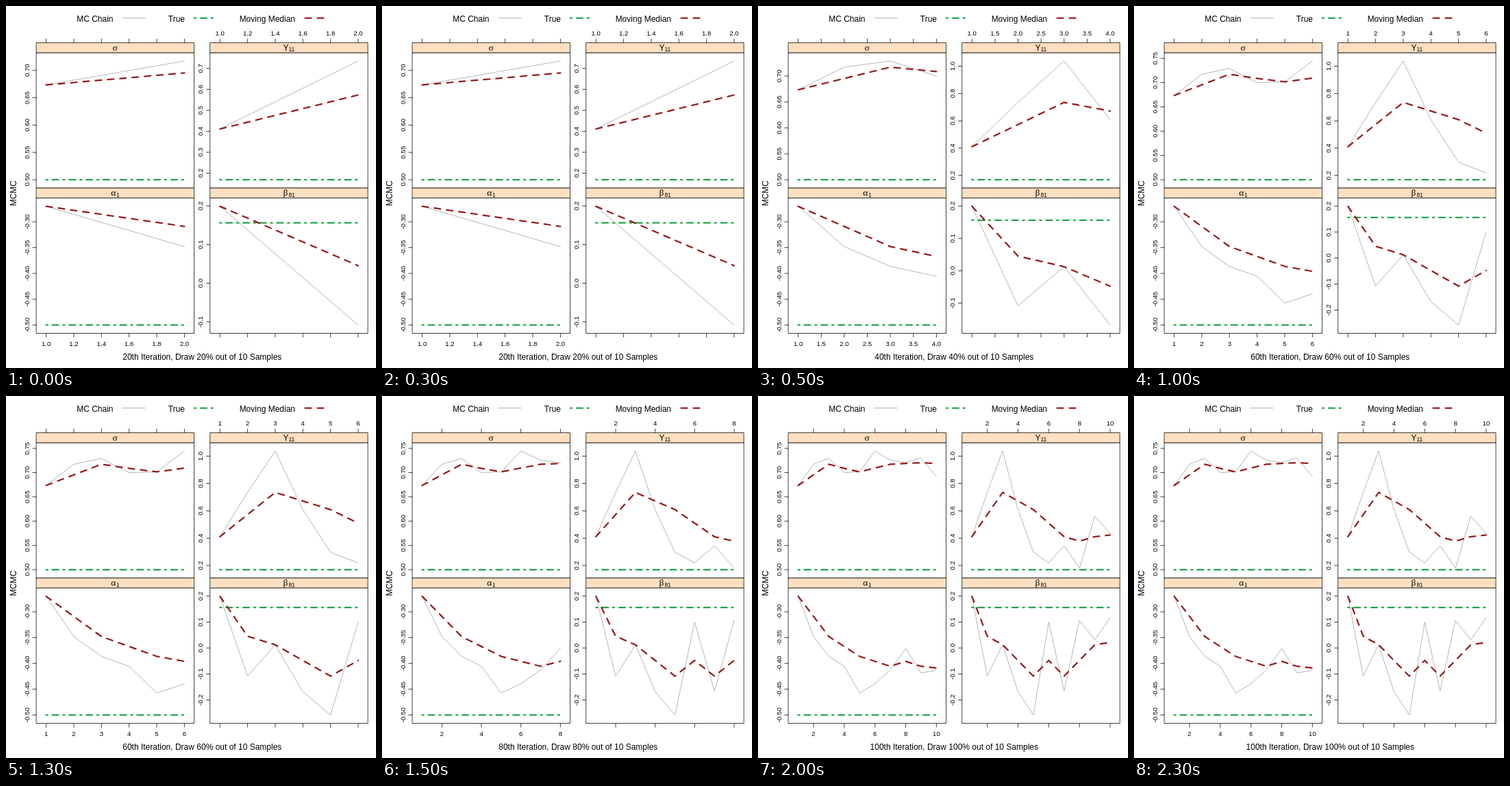
An HTML page with a canvas that plays this animation: 540x527 px, repeating every 2500 ms.

```html
<!DOCTYPE html>
<html lang="en">
<head>
<meta charset="utf-8">
<style>
  html, body { margin: 0; width: 100%; height: 100%; overflow: hidden; background: #fff; }
  canvas { display: block; }
</style>
</head>
<body>
<canvas id="stage" width="540" height="527"></canvas>
<script>
const ctx = document.getElementById('stage').getContext('2d');
const SANS = '"Liberation Sans", Arial, sans-serif';
const SERIF = '"Liberation Serif", "Times New Roman", serif';
const W = 230, H = 197, STRIP = 14.5, PAD = 0.07 / 1.14;
const X_STEPS = [0.2, 0.5, 1, 2, 2];

const CHAIN = { color: '#acacac', width: 0.9, dash: [] };
const TRUE = { color: '#1fa64a', width: 2.25, dash: [1, 3, 4, 3] };
const MEDIAN = { color: '#981b1b', width: 2.25, dash: [4, 4] };

const panels = [
  { x: 44.5, y: 68, symbol: 'σ', sub: '', truth: 0.5, digits: 2, step: () => 0.05,
    chain: [.6735, .7172, .729, .7, .7015, .7444, .7255, .7203, .7302, .691] },
  { x: 298.1, y: 68, symbol: 'Υ', sub: '11', truth: 0.169, digits: 1, step: n => n < 3 ? 0.1 : 0.2,
    chain: [.411, .735, 1.038, .609, .297, .219, .345, .1815, .561, .435] },
  { x: 44.5, y: 279.5, symbol: 'α', sub: '1', truth: -0.5, digits: 2, step: () => 0.05,
    chain: [-.27, -.348, -.3864, -.4056, -.4575, -.4395, -.4125, -.3711, -.4183, -.4135] },
  { x: 298.1, y: 279.5, symbol: 'β', sub: '81', truth: 0.1562, digits: 1, step: () => 0.1,
    chain: [.199, -.108, .0125, -.1675, -.2575, .1, -.1655, .1065, .031, .117] }
];

function median(values) {
  const s = [...values].sort((a, b) => a - b), m = s.length >> 1;
  return s.length % 2 ? s[m] : (s[m - 1] + s[m]) / 2;
}

function line(points, { color, width, dash }) {
  ctx.strokeStyle = color;
  ctx.lineWidth = width;
  ctx.lineCap = ctx.lineJoin = 'round';
  ctx.setLineDash(dash.map(d => d * width));
  ctx.beginPath();
  points.forEach(([x, y]) => ctx.lineTo(x, y));
  ctx.stroke();
  ctx.setLineDash([]);
}

function text(str, x, y, { size = 12, align = 'center', font = SANS, turn = 0 } = {}) {
  ctx.save();
  ctx.translate(x, y);
  ctx.rotate(turn);
  ctx.font = `${size}px ${font}`;
  ctx.textAlign = align;
  ctx.fillStyle = '#000';
  ctx.fillText(str, 0, 0);
  ctx.restore();
}

function tick(x, y, dx, dy) {
  ctx.strokeStyle = '#000';
  ctx.lineWidth = 0.75;
  ctx.lineCap = 'butt';
  ctx.beginPath();
  ctx.moveTo(x, y);
  ctx.lineTo(x + dx, y + dy);
  ctx.stroke();
}

// Multiples of step inside the padded range
function ticks(lo, hi, step) {
  const pad = 0.07 * (hi - lo), list = [];
  for (let k = Math.ceil((lo - pad) / step); k * step <= hi + pad; k++) list.push(k * step);
  return list;
}

const scale = (lo, hi, from, to) => v => from + (v - lo) / (hi - lo) * (to - from);

function frameBox(x, y, h, fill) {
  ctx.fillStyle = fill;
  ctx.fillRect(x, y, W, h);
  ctx.strokeStyle = '#000';
  ctx.lineWidth = 0.75;
  ctx.strokeRect(x, y, W, h);
}

function drawPanel(p, index, stage) {
  const n = 2 * (stage + 1), data = p.chain.slice(0, n);
  const lo = Math.min(p.truth, ...data), hi = Math.max(p.truth, ...data);
  const px = scale(1, n, p.x + W * PAD, p.x + W * (1 - PAD));
  const py = scale(lo, hi, p.y + H * (1 - PAD), p.y + H * PAD);
  const plot = values => values.map((v, i) => [px(i + 1), py(v)]);

  frameBox(p.x, p.y, H, '#fff');
  frameBox(p.x, p.y - STRIP, STRIP, '#ffdfbf');

  const mid = p.x + W / 2, base = p.y - 3.2;
  const left = mid - 3.9 - p.sub.length * 2.3;
  text(p.symbol, left, base, { size: p.symbol === 'Υ' ? 12 : 13.5, align: 'left', font: p.symbol === 'Υ' ? SANS : SERIF });
  text(p.sub, left + 7.8, base + 1.6, { size: 8.4, align: 'left' });

  for (const v of ticks(lo, hi, p.step(n))) {
    tick(p.x, py(v), -6, 0);
    text(v.toFixed(p.digits), p.x - 11, py(v), { size: 9.6, turn: -Math.PI / 2 });
  }
  const top = index < 2;
  for (const v of ticks(1, n, X_STEPS[stage])) {
    tick(px(v), top ? p.y - STRIP : p.y + H, 0, top ? -6 : 6);
    if (index === 1 || index === 2)
      text(v.toFixed(n < 5 ? 1 : 0), px(v), top ? 43 : 495, { size: 9.6 });
  }

  line(plot(data), CHAIN);
  line([[px(1), py(p.truth)], [px(n), py(p.truth)]], TRUE);
  line(plot(data.map((_, i) => median(data.slice(0, i + 1)))), MEDIAN);
}

function draw(stage) {
  ctx.fillStyle = '#fff';
  ctx.fillRect(0, 0, 540, 527);
  [['MC Chain', 156.5, 169.5, CHAIN], ['True', 261, 275, TRUE], ['Moving Median', 422, 436.5, MEDIAN]]
    .forEach(([label, end, x, style]) => {
      text(label, end, 23, { align: 'right' });
      line([[x, 17.5], [x + 33.5, 17.5]], style);
    });
  panels.forEach((p, i) => drawPanel(p, i, stage));
  text('MCMC', 15, 272.7, { turn: -Math.PI / 2 });
  const share = 20 * (stage + 1);
  text(`${share}th Iteration, Draw ${share}% out of 10 Samples`, 286.3, 514.8);
}

function loop() {
  draw(Math.floor(performance.now() % 2500 / 500));
  requestAnimationFrame(loop);
}
loop();
</script>
</body>
</html>
```
